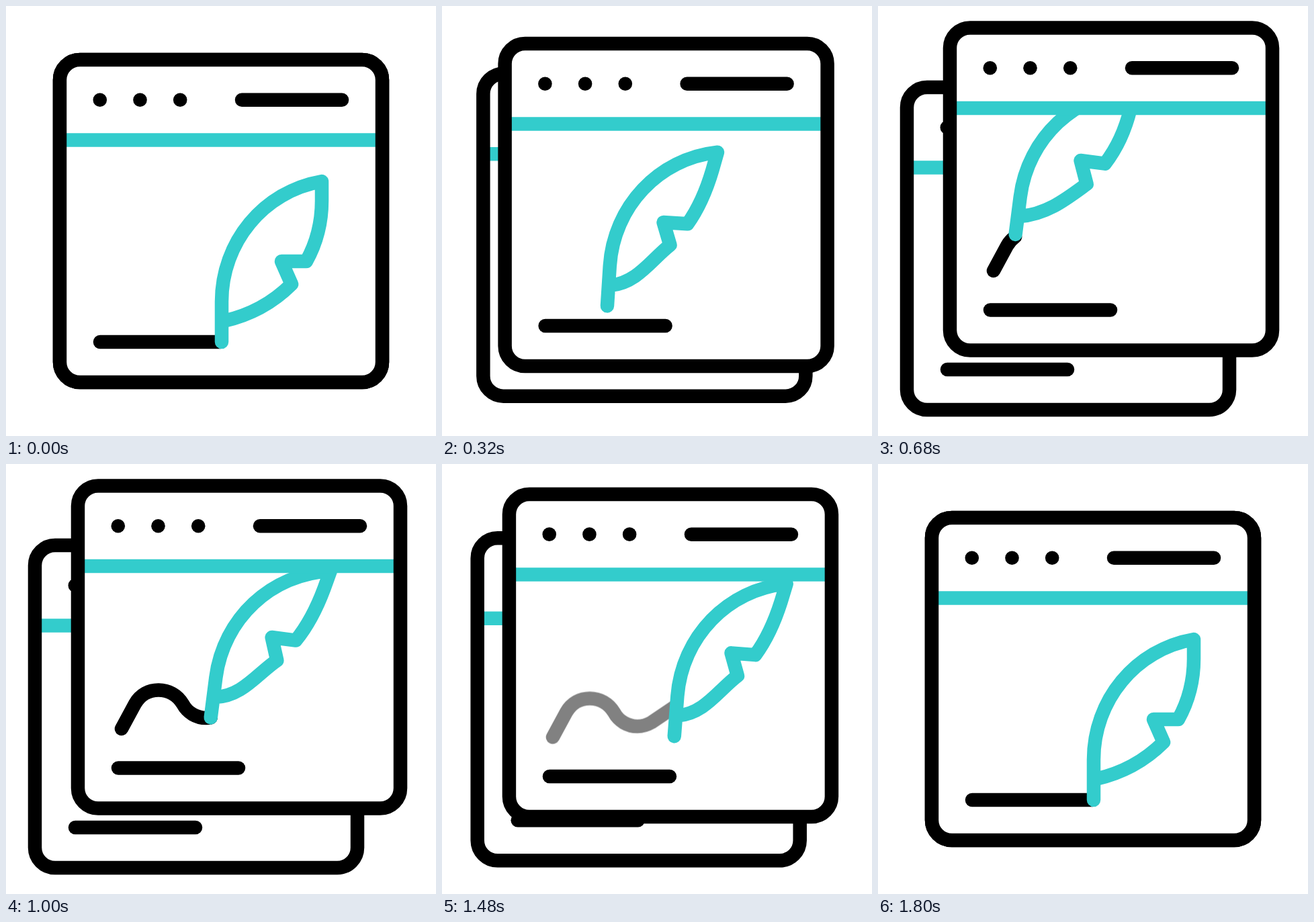
Recreate the animation shown at these times as an HTML page without scripts. Size 640x640 px, loop 1.92 s.

```html
<!DOCTYPE html>
<html lang="en">
<head>
<meta charset="utf-8">
<title>Signing a page</title>
<style>
  :root {
    --teal: #3cc;
    --ink: path("M172 394 L192 357 C200 343 213 336.5 227 336.5 C242 336.5 255 344 263 357 C270 370 283 378 298 378 C306 378 313 375.5 319 372 L362 343");
    --straight: path("M0 0 L0 -60 C0 -148 62 -224 149 -239 L149 -210 C149 -178 141 -147 126 -120 L89 -120 L104 -86 C77 -59 43 -40 3 -31");
    --eased: path("M0 -6 L0 -60 C0 -148 62 -224 149 -239 L148 -210 C147 -179 139 -148 124 -121.5 L87 -121.5 L101.5 -87.5 C74.5 -61 43 -40 3 -31");
    --bent: path("M0 0 L0 -60 C0 -148 62 -224 149 -239 L143 -212 C136 -182 126 -154 111 -130 L75 -130 L87 -97 C60 -73 42 -37 3 -31");
  }
  html, body { margin: 0; width: 100%; height: 100%; overflow: hidden; background: #fff; }
  svg { display: block; width: 100%; height: 100%; }
  .line { fill: none; stroke: #000; stroke-width: 20.5; stroke-linecap: round; stroke-linejoin: round; }

  .back, .front, .travel, .feather { animation: 1920ms cubic-bezier(.3333, 0, .6667, 1) infinite; }
  .trace, .ink { animation: 1920ms linear infinite; }
  .back { --shift: -37px 41px; animation-name: slide; }
  .front { --shift: 27px -47.5px; animation-name: slide; }
  .travel { animation-name: travel; }
  .trace { offset-path: var(--ink); offset-rotate: 0deg; animation-name: trace; }
  .ink { d: var(--ink); stroke-dasharray: 100 200; animation-name: write, fade; }
  .feather { d: var(--straight); fill: #fff; stroke: var(--teal); animation-name: lean, bend; }

  @keyframes slide {
    0%, 6.25%, 93.75%, 100% { translate: 0 0; }
    27.083%, 68.75% { translate: var(--shift); }
  }
  @keyframes travel {
    0%, 6.25% { translate: 149px 106px; }
    27.083%, 64.583% { translate: 0 0; }
    93.75%, 100% { translate: -41px 157px; }
  }
  @keyframes trace {
    0%, 27.083% { offset-distance: 0%; }
    35.417% { offset-distance: 24.5%; }
    52.083% { offset-distance: 72.4%; }
    64.583%, 100% { offset-distance: 100%; }
  }
  @keyframes write {
    0%, 27.083% { stroke-dashoffset: 100; }
    35.417% { stroke-dashoffset: 75.5; }
    52.083% { stroke-dashoffset: 27.6; }
    64.583%, 100% { stroke-dashoffset: 0; }
  }
  @keyframes fade {
    0%, 27.083% { opacity: 0; }
    27.1%, 66.667% { opacity: 1; }
    87.5%, 100% { opacity: 0; }
  }
  @keyframes lean {
    0%, 6.25%, 93.75%, 100% { rotate: 0deg; }
    27.083%, 64.583% { rotate: 7.3deg; }
  }
  @keyframes bend {
    0%, 6.25%, 93.75%, 100% { d: var(--straight); }
    15.1%, 43.75%, 77.083% { d: var(--bent); }
    29.167% { d: var(--eased); }
  }
</style>
</head>
<body>
<svg viewBox="0 0 640 640">
  <defs>
    <g id="page">
      <rect x="80" y="80" width="480" height="480" rx="30" fill="#fff"/>
      <path class="line" d="M140 500H319"/>
    </g>
    <!-- Drawn over the feather so that it slips behind the title bar -->
    <g id="header">
      <path d="M90 90H550V190H90Z" fill="#fff"/>
      <path d="M85 199.5H555" stroke="#3cc" stroke-width="20.5"/>
      <circle cx="139.8" cy="139.7" r="10.3"/>
      <circle cx="199.5" cy="139.7" r="10.3"/>
      <circle cx="259.2" cy="139.7" r="10.3"/>
      <path class="line" d="M351 139.7H500"/>
      <rect class="line" x="80" y="80" width="480" height="480" rx="30"/>
    </g>
  </defs>

  <g class="back">
    <use href="#page"/>
    <use href="#header"/>
  </g>
  <g class="front">
    <use href="#page"/>
    <g transform="translate(-27 47.5)">
      <path class="line ink" pathLength="100"/>
    </g>
  </g>
  <g class="travel">
    <g class="trace">
      <path class="line feather"/>
    </g>
  </g>
  <g class="front">
    <use href="#header"/>
  </g>
</svg>
</body>
</html>
```
